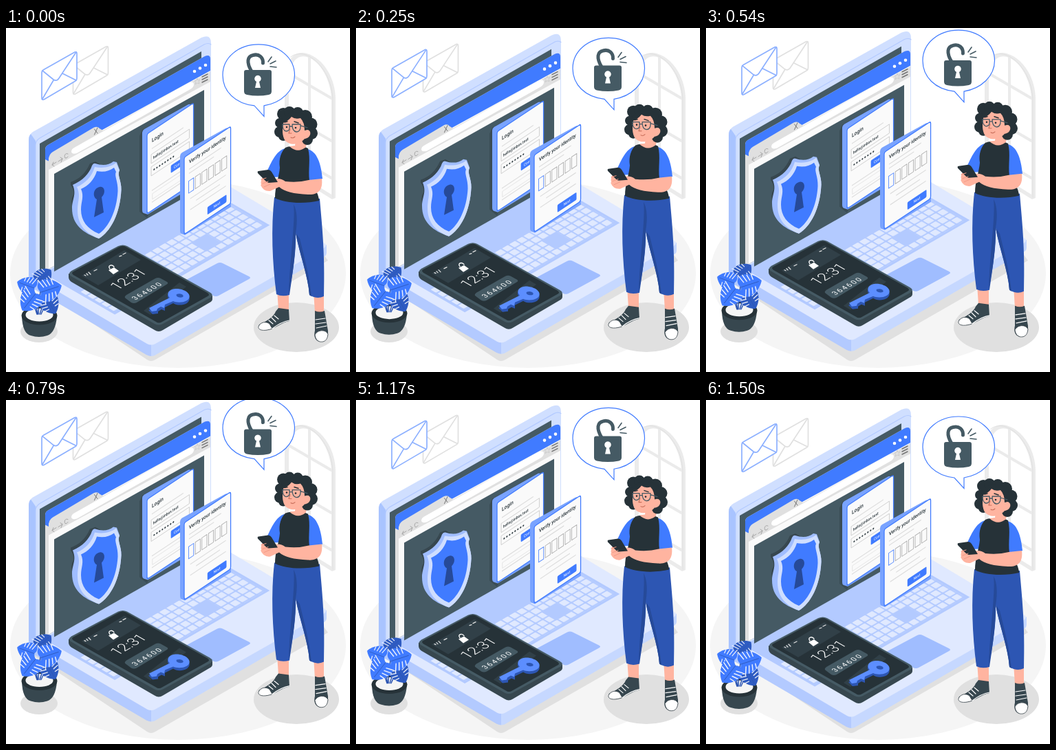
An HTML page that plays this animation: 500 by 500 pixels, repeating every 1540 ms.

```html
<!DOCTYPE html>
<html lang="en">
<head>
<meta charset="utf-8">
<style>
  html, body { margin: 0; width: 100%; height: 100%; overflow: hidden; background: #fff; }
  svg { display: block; width: 100vw; height: 100vh; }
  text { font-family: Roboto, "Open Sans", sans-serif; }
  .line { fill: none; stroke-linecap: round; stroke-linejoin: round; }
  .blue { fill: #407bff; }
  .navy { fill: #2d56b3; }
  .dark { fill: #263238; }
  .slate { fill: #37474f; }
  .steel { fill: #455a64; }
  .skin { fill: #ffb4a0; }
  .white { fill: #fff; }
  .shadow { fill: #e0e0e0; }
  .rule { stroke: #dcdcdc; stroke-width: 1.3; }
  .field { fill: none; stroke: #c4c4c4; stroke-width: .7; }
</style>
</head>
<body>
<svg viewBox="0 0 500 500">
  <defs>
    <pattern id="keys" width="12" height="11.6" patternUnits="userSpaceOnUse">
      <rect width="9.8" height="9.4" rx="1.2" fill="#e0e9ff"/>
    </pattern>
    <g id="mail" class="line" stroke-width="1.7">
      <path d="M54 61L100 35Q103 34 103 37V73Q103 76 101 77L55 104Q52 105 52 102V65Q52 62 54 61Z" fill="#fff"/>
      <path d="M53 62L69 75Q74 78 77 73L102 35M53 103L69 76M102 76L82 66"/>
    </g>
  </defs>

  <!-- floor, window and shadows -->
  <ellipse cx="250" cy="357" rx="244" ry="137" fill="#f5f5f5"/>
  <path d="M405 206V80C405 48 418 32 437 37C462 44 479 74 479 104V247L474 249Z" fill="#ebebeb"/>
  <path d="M411 204V82C411 53 421 38 437 42C458 48 473 78 473 106V242Z" class="white"/>
  <path d="M441 42V222M411 66L473 102M411 128L473 164M411 182L473 218" class="line" stroke="#ebebeb" stroke-width="4"/>
  <path d="M414 42C437 24 475 62 475 105V246" class="line" stroke="#e0e0e0" stroke-width="1"/>
  <path d="M34 368L205 482Q211 486 217 482L468 338L440 300Z" class="shadow"/>
  <ellipse cx="48" cy="441" rx="27" ry="16" class="shadow"/>
  <ellipse cx="422" cy="435" rx="62" ry="36" class="shadow"/>

  <!-- speech bubble -->
  <g data-rise="29">
    <path d="M361 113C333 110 315 92 315 68.500C315 43 338 24 367 24C396 24 419.500 43 419.500 68.500C419.500 91 400 109 375 113V128.500Z" class="white" stroke="#407bff" stroke-width="1.2"/>
  </g>
  <g data-rise="19.5">
    <path d="M357 63C349 50 351 41 359 39.500C368 37 374 43 373.500 51" class="line" stroke="#455a64" stroke-width="5"/>
    <path d="M349 61H383Q386 61 386 64V92Q386 96 382 97Q366 100 350 97Q346 96 346 92V64Q346 61 349 61Z" class="steel"/>
    <path d="M364 78L362 87H370L368 78A4.800 4.800 0 1 0 364 78Z" class="white"/>
    <path d="M381 49L386 42M384 52L392 48M384 56L393 57" class="line" stroke="#455a64" stroke-width="1.6"/>
  </g>

  <g data-rise="10">
    <use href="#mail" x="45.500" y="-8" stroke="#e0e0e0"/>
    <use href="#mail" stroke="#8cb0ff"/>

    <!-- laptop base -->
    <path d="M33 358L211 460V477Q208 477 204 475L33 375Z" fill="#b3caff"/>
    <path d="M211 460L466 315V327Q466 330 463 332L216 476Q213 477 211 477Z" fill="#c6d8ff"/>
    <path d="M33 358L298 214L462 312Q468 316 462 320L217 459Q211 462 205 459Z" fill="#e0e9ff"/>
    <g transform="matrix(.866 -.5 .866 .5 88 372)">
      <path d="M-4-46H256V85H-4Z" fill="#b3caff"/>
      <path d="M0 23.200H252V81.200H0Z" fill="url(#keys)"/>
      <path d="M164 45H190V70H164Z" fill="#b3caff"/>
      <rect x="60" y="69.600" width="58" height="9.400" rx="1.200" fill="#e0e9ff"/>
    </g>
    <path d="M262 366L307 342Q311 340 315 342L353 361Q357 363 353 365L309 389Q305 391 301 389L262 370Q259 368 262 366Z" fill="#a0bdff"/>

    <!-- laptop screen -->
    <path d="M33 360V163Q33 155 39 151L284 14Q298 8 298 22V216L43 364Z" fill="#d0dfff"/>
    <path d="M33 360V163Q33 157 36 154L43 164V364Z" fill="#a9c4ff"/>
    <path d="M43 364V170Q43 164 49 160L288 24Q294 21 298 24" class="line" stroke="#b3caff" stroke-width="1.2"/>
    <path d="M49 358V168L284 34V220Z" class="steel"/>

    <!-- browser -->
    <path d="M57 177Q57 172 61 170L289 41Q297 38 297 45V213L63 350L57 354Z" fill="#e0e0e0"/>
    <path d="M57 177Q57 172 61 170L289 41Q297 38 297 45V64L63 194L57 191Z" class="blue"/>
    <path d="M62 350V189L140 148L297 62V213Z" fill="#fafafa"/>
    <path d="M62 206V190Q63 183 68 180L127 145Q133 142 136 146L141 149L297 63V78Z" fill="#e0e0e0"/>
    <path d="M99 174L265 80Q273 77 273 82Q273 86 268 89L103 182Q96 184 95 180Q95 176 99 174Z" class="white"/>
    <path d="M70 354V212L288 90V230Z" class="steel"/>
    <g class="white"><circle cx="274" cy="63" r="2.300"/><circle cx="282" cy="58.500" r="2.300"/><circle cx="290" cy="54" r="2.300"/></g>
    <path d="M285 71L293 67M285 75L293 71M285 79L293 75" class="line" stroke="#757575" stroke-width="1.5"/>
    <path d="M128.500 147L133 153M133 145L128.500 155" class="line" stroke="#757575"/>
    <path d="M73 195L67 199M69 195L67 199L70 201M76 194L82 190M79 188L82 190L80 195M90 183C86 181 84 186 86 189Q88 190 90 187" class="line" stroke="#a6a6a6"/>
    <path d="M278 73L279 76L282 75L280 78L281 81L278 80L275 82L276 79L274 77L277 76Z" fill="none" stroke="#c4c4c4" stroke-width=".7"/>

    <!-- shield -->
    <path d="M94 224C106 220 116 211 122 197L130 194L140 200L104 265L97 262Q93 250 98 242Q99 235 94 228Z" class="slate"/>
    <path d="M97 228C111 222 121 212 125 200Q127 196 130 197C139 200 149 200 156 194L161 195L165 206C161 213 168 222 167.500 235C166 270 152 296 135 306C112 298 96 286 96 262C96 249 103 242 97 228Z" fill="#a0bdff"/>
    <path d="M103 231C115 226 125 216 129 202C140 204 151 203 160 196L165 207C161 214 168 222 167.500 235C166 270 152 296 135 306C114 298 104 284 104 265C104 251 109 244 103 231Z" fill="#cfdeff"/>
    <path d="M109 234C120 229 128 221 132 208C142 210 150 208 157 203L160 209C157 215 163 223 162.500 237C161 266 149 290 135 299C118 292 109 280 109 264C109 252 114 245 109 234Z" class="blue"/>
    <path d="M132 249L128 275L142 268L139 246C146 239 143 229 136 231C127 233 125 245 132 249Z" fill="#264a99"/>

    <!-- login card -->
    <path d="M194 157L198 148L266 110L273 113L205 276L194 267Z" class="slate" opacity=".7"/>
    <path d="M198 152Q198 149 201 147L265 111Q268 110 273 114V230L206 271L200 269Q198 268 198 265Z" fill="#79a3ff"/>
    <g transform="matrix(.866 -.5770 0 1 205 154)">
      <rect width="78" height="116" rx="3" fill="#fafafa" stroke="#407bff" stroke-width="1.5"/>
      <text x="8" y="17" font-size="7.800" font-weight="500" class="dark">Login</text>
      <path d="M8 26H61" class="rule"/>
      <rect x="7" y="34" width="64" height="13" class="field"/>
      <text x="10" y="42.500" font-size="5.700" font-weight="500" class="dark">hello@inbox.test</text>
      <rect x="7" y="52" width="64" height="13" class="field"/>
      <path d="M12 58.500H47" class="line" stroke="#263238" stroke-width="2.400" stroke-dasharray="0 4.600"/>
      <rect x="40" y="69" width="31" height="11" rx="1.500" class="blue"/>
      <text x="45" y="76.500" font-size="5.500" class="white">Confirm</text>
      <path d="M8 87H71M8 104H71" class="rule"/>
      <rect x="9" y="92" width="62" height="8" class="field" opacity=".5"/>
    </g>

    <!-- verification card -->
    <path d="M253 187Q253 183 256 181L319 146Q323 144 327 148V260L260 301L255 299Q253 298 253 295Z" fill="#79a3ff"/>
    <g transform="matrix(.866 -.5770 0 1 259 188)">
      <rect width="78" height="112" rx="3" fill="#fafafa" stroke="#407bff" stroke-width="1.5"/>
      <text x="8" y="14" font-size="7.400" font-weight="500" class="dark">Verify your identity</text>
      <path d="M8 22H62M8 28H50M10 66H70M20 74H60M10 82H70" class="rule"/>
      <g id="code" fill="none" stroke-width=".9"></g>
      <rect x="39" y="95" width="32" height="11" rx="1.500" class="blue"/>
      <text x="55" y="102.500" font-size="5.500" text-anchor="middle" class="white">Next</text>
    </g>

    <!-- phone -->
    <path d="M91 357L300 389V394Q300 397 296 399L228 439Q222 443 216 439L95 369Q91 366 91 362Z" class="slate"/>
    <path d="M95 353L163 317Q170 314 176 317L296 384Q303 388 297 392L228 430Q222 433 216 430L95 361Q89 357 95 353Z" class="steel"/>
    <path d="M98 354L165 318Q170 316 174 318L293 385Q297 388 293 390L227 427Q222 430 218 427L98 359Q94 356 98 354Z" class="dark"/>
    <path d="M110 360L172 323L196 337L134 374ZM200 411L252 370L262 376L210 417Z" class="steel" opacity=".35"/>
    <path d="M175 388L217 364Q221 362 225 364L234 369Q237 371 233 373L190 399Q186 401 182 399L174 393Q171 391 175 388Z" class="steel"/>
    <g class="white" text-anchor="middle">
      <text transform="matrix(.866 -.5 .866 .5 178 365)" y="7" font-size="21" font-weight="300">12:31</text>
      <text transform="matrix(.866 -.5 .866 .5 205 382)" y="4" font-size="10.500" letter-spacing="2">364600</text>
      <path d="M149 352L157 348L164 353L156 358Z"/>
    </g>
    <path d="M151 350C147 345 154 343 157 347" class="line" stroke="#fff" stroke-width="1.4"/>
    <path d="M114 359L116 360M117 357L119 359M120 355L123 358M128 353L132 351M165 332L168 331M170 329L174 327" class="line" stroke="#e0e0e0" stroke-width="1.3"/>
    <path d="M207 410L238 395C230 387 239 381 250 382C266 384 271 394 263 400C256 404 247 403 243 400L231 406V411L226 409L221 412V415L213 416Z" class="navy"/>
    <path fill-rule="evenodd" d="M208 407L238 392C231 384 240 378 250 379C266 381 271 391 263 396C256 400 247 399 243 397L231 402L230 407L225 405L220 408L219 411L212 412ZM248 387C246 390 252 393 257 391C260 388 253 385 248 387Z" fill="#5c8eff"/>

    <!-- plant -->
    <path d="M23 419Q24 444 36 447Q48 451 60 447Q72 443 74 419Z" class="slate"/>
    <ellipse cx="48.500" cy="418" rx="26" ry="13.500" class="dark"/>
    <ellipse cx="48.500" cy="417" rx="20" ry="9.500" fill="#f5f5f5"/>
    <g id="plant" class="line"></g>

    <!-- person: legs and shoes -->
    <path d="M394 380H411V411L396 409ZM447 382H462V414H449Z" class="skin"/>
    <path d="M396 407L411 409L412 426C400 428 392 437 380 439C370 440 365 437 368 431C378 427 389 420 392 412Z" class="slate"/>
    <path d="M449 411Q456 414 463 411L468 440C469 452 463 457 456 456C449 455 447 447 449 440Z" class="slate"/>
    <path d="M367 434C370 427 378 426 383 430L387 437C376 441 366 440 367 434ZM449 446C453 438 465 438 468 445C467 454 463 457 456 456Q450 454 449 446Z" class="white" stroke="#263238" stroke-width=".7"/>
    <path d="M382 425L388 430M386 421L392 427M390 418L396 423M450 424L464 422M450 430L465 428M451 436L466 433M387 437Q400 427 412 425" class="line" stroke="#fff" stroke-width="1.2"/>
    <path d="M390 246L456 248C459 285 464 325 462 390Q452 395 441 388C439 360 427 330 421 298C421 330 416 360 412 388Q401 391 393 387C387 340 385 292 390 246Z" class="navy"/>
    <path d="M421 298C424 280 423 265 418 256C421 280 412 340 411 388C417 355 422 325 421 298ZM441 388C439 360 427 330 421 298L427 306C434 335 441 360 444 390Z" fill="#264a99"/>

    <!-- person: body -->
    <path d="M406 175C392 178 385 197 379 209L388 217L404 216ZM438 176C452 179 458 197 460 219Q451 224 438 222Z" class="blue"/>
    <path d="M406 174C412 171 433 171 439 175C443 190 439 206 441 222C451 234 455 245 455 251C435 256 405 255 391 247C391 230 397 216 398 203C396 190 400 180 406 174Z" class="dark"/>
    <path d="M412 172Q424 183 436 173L439 157L421 162L420 171Z" class="skin"/>
    <path d="M379 209L388 216L384 228L374 233Q367 225 374 215ZM459 219C461 235 454 243 439 242C418 241 405 238 397 231L384 237Q374 238 370 228L386 221Q397 216 406 223Q425 225 440 221Z" class="skin"/>
    <path d="M367 208L381 206Q384 206 386 209L395 224L382 225Q379 225 377 222L366 211Q365 208 367 208Z" class="dark"/>
    <path d="M371 220L378 218M373 226L381 223M375 231L384 227" class="line" stroke="#f29b87" stroke-width="1"/>

    <!-- person: head -->
    <g id="hair" class="dark"></g>
    <path d="M404 134C401 146 401 157 406 164C414 172 427 169 434 161C445 160 445 146 435 148L433 131Q418 122 404 134Z" class="skin"/>
    <path d="M400 139C402 122 424 118 439 129L442 147L434 149Q434 137 428 131Q420 133 415 129Q410 136 400 139Z" class="dark"/>
    <path d="M405 137L409 136M419 136L425 138" class="line" stroke="#263238" stroke-width="1.5"/>
    <path d="M413 147L411 153L415 153M414 159Q417 161 420 158" class="line" stroke="#c9705c" stroke-width="1.1"/>
    <g class="dark"><circle cx="408" cy="144" r="1.300"/><circle cx="421" cy="145" r="1.300"/></g>
    <path d="M402 140H412V145Q412 150 407 150Q402 149 402 140ZM416 140H428V145Q427 151 422 151Q416 150 416 140ZM412 143H416M428 142L438 145" class="line" stroke="#455a64" stroke-width="1.3"/>
  </g>
</svg>
<script>
  const PERIOD = 1500, LOOP = 1540;
  const byId = id => document.getElementById(id);

  byId('code').innerHTML = Array.from({ length: 6 }, (_, i) =>
    `<rect x="${7.5 + i * 11.1}" y="39" width="8.400" height="17.500" stroke="${i ? '#a6a6a6' : '#407bff'}"/>`).join('');

  const curls = [[403, 125, 9], [412, 122, 8], [424, 123, 8], [435, 129, 10], [443, 140, 9.5],
    [444, 153, 9], [438, 162, 8], [398, 138, 7], [398, 151, 8], [403, 157, 7], [420, 140, 18]];
  byId('hair').innerHTML = curls.map(([x, y, r]) => `<circle cx="${x}" cy="${y}" r="${r}"/>`).join('');

  // A heart-shaped leaf with slits cut in from both edges.
  function leaf(x, y, angle, scale, color) {
    let slits = '';
    for (let i = 0; i < 4; i++)
      for (const side of [-1, 1])
        slits += `M${side * (19 - i * 2)} ${-1 - i * 6.5}L${side * 6} ${-6 - i * 5}`;
    return `<g transform="translate(${x} ${y}) rotate(${angle}) scale(${scale})">
      <path d="M0 0C-8 6-19 2-17-11C-15-22-6-30 0-33C6-30 15-22 17-11C19 2 8 6 0 0Z" fill="${color}"/>
      <path d="${slits}" stroke="#edf1fb" stroke-width="1.500"/>
      <path d="M0 0V-28" stroke="#2d56b3" stroke-width=".8"/></g>`;
  }
  byId('plant').innerHTML =
    '<path d="M47 416Q48 385 54 365M46 416Q42 390 36 378M49 416Q54 400 61 390M45 416Q41 402 36 396M51 416Q55 406 62 400" stroke="#2d56b3" stroke-width="1.5"/>' +
    leaf(47, 368, 48, 0.75, '#2f5cc2') + leaf(41, 378, -70, 0.8, '#407bff') +
    leaf(58, 391, 150, 0.85, '#2f5cc2') + leaf(43, 386, -142, 0.95, '#407bff') +
    leaf(51, 384, 72, 0.95, '#407bff');

  const floaters = document.querySelectorAll('[data-rise]');
  function draw(now) {
    const phase = Math.min(now % LOOP, PERIOD) / PERIOD;
    const lift = 1 - Math.abs(1 - 2 * phase);
    for (const part of floaters)
      part.setAttribute('transform', `translate(0 ${-part.dataset.rise * lift})`);
    requestAnimationFrame(draw);
  }
  draw(0);
</script>
</body>
</html>
```
